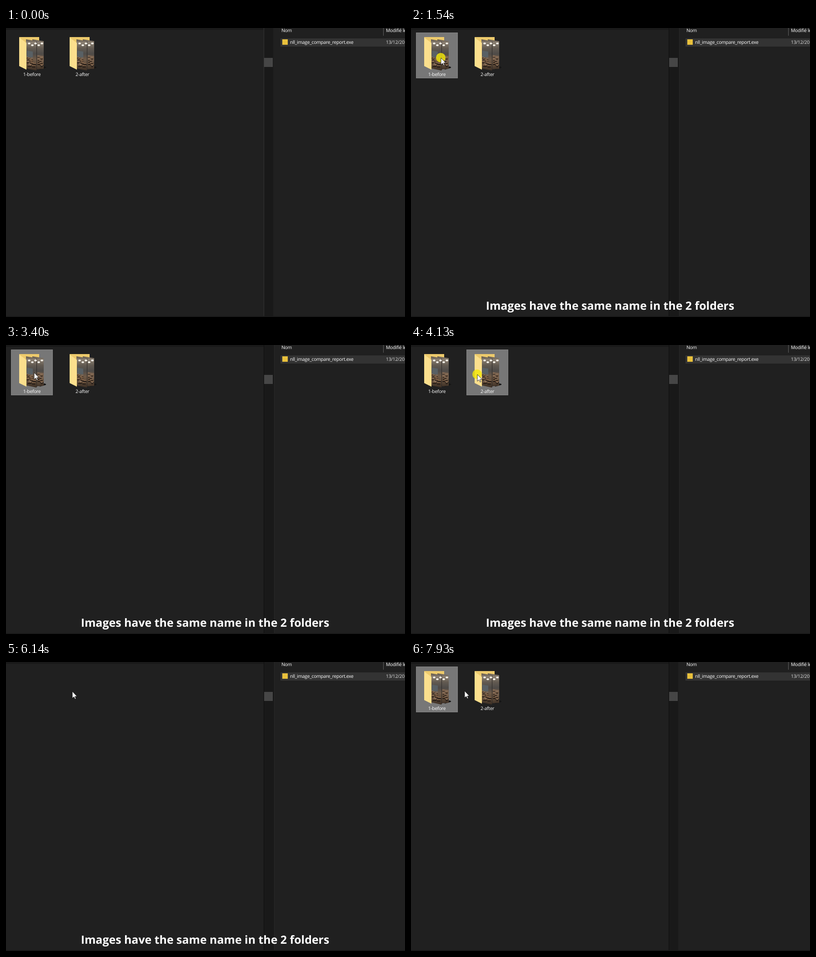
Write an HTML page with a canvas that moves like this. It is 878 px wide and 638 px high and loops after 8 s.

```html
<!DOCTYPE html>
<html lang="en">
<head>
<meta charset="utf-8">
<title>Folder browsing</title>
<style>
  html, body { margin: 0; width: 100%; height: 100%; overflow: hidden; background: #202020; }
  #stage { position: relative; width: 878px; height: 638px; overflow: hidden; }
  canvas { position: absolute; left: 0; top: 0; }
  span {
    position: absolute; white-space: nowrap; color: #fff;
    font: 500 10.4px/14px "Open Sans", "Noto Sans", sans-serif;
    letter-spacing: -0.3px; text-rendering: geometricPrecision;
  }
  .head { top: -1px; }
  .row { top: 25px; }
  .name { left: 606px; }
  .date { left: 836px; }
  .label { width: 100px; line-height: 13px; text-align: center; }
  .first { left: 7px; }
  .second { left: 118px; }
  #folders .label { top: 97px; }
  #images .label { top: 63px; }
  #caption {
    left: 0; width: 876px; top: 598px; text-align: center;
    font: 700 24.9px/30px "Open Sans", "Noto Sans", sans-serif;
    letter-spacing: 0;
  }
</style>
</head>
<body>
<div id="stage">
  <canvas id="scene" width="878" height="638"></canvas>
  <span class="head name">Nom</span>
  <span class="head date">Modifié le</span>
  <span class="row" style="left:625px">nll_image_compare_report.exe</span>
  <span class="row date" style="color:#ddd">13/12/20</span>
  <div id="folders">
    <span class="label first">1-before</span>
    <span class="label second">2-after</span>
  </div>
  <div id="images">
    <span class="label first">classroom<br>100spp.png</span>
    <span class="label second">classroom<br>300spp.png</span>
  </div>
  <span id="caption">Images have the same name in the 2 folders</span>
  <canvas id="pointer" width="878" height="638"></canvas>
</div>
<script>
const LOOP = 8000, STEP = 78, OPENING = 160, LEAVING = 150;
const byId = id => document.getElementById(id);
const g = byId('scene').getContext('2d');
const p = byId('pointer').getContext('2d');

const CAPTION = { from: 210, to: 6690 };
const SELECTS = [
  { at: 1140, item: 0, hold: 80 }, { at: 4130, item: 1, hold: 150 }, { at: 7240, item: 0, hold: 220 }
];
const VISITS = [{ open: 1540, back: 3250 }, { open: 4500, back: 6140 }];
const MOVES = [
  { from: 210, to: 910, x: 66, y: 66 }, { from: 2800, to: 2800, x: 62, y: 61 },
  { from: 3720, to: 3880, x: 146, y: 65 }, { from: 6690, to: 6920, x: 77, y: 62 },
  { from: 7860, to: 7930, x: 118, y: 64 }
];

const during = (t, from, to) => t >= from && t < to;

function viewAt(t) {
  for (const { open, back } of VISITS) {
    if (during(t, open + OPENING, back)) return 'images';
    if (during(t, open + OPENING / 2, back + LEAVING)) return 'empty';
  }
  return 'folders';
}

function pointerAt(t) {
  if (t < MOVES[0].from) return null;
  let x = 500, y = 485;
  for (const m of MOVES) {
    if (t < m.from) break;
    const span = m.to - m.from;
    const steps = Math.round(span / STEP) + 1;
    const done = t >= m.to ? steps : Math.floor((t - m.from) / span * (steps - 1)) + 1;
    x += (m.x - x) * done / steps;
    y += (m.y - y) * done / steps;
  }
  return { x: Math.round(x), y: Math.round(y) };
}

const isPressed = t => SELECTS.some(s => during(t, s.at, s.at + s.hold)) ||
  VISITS.some(v => during(t, v.open, v.open + OPENING));

function randomFrom(seed) {
  return () => (seed = (seed * 16807) % 2147483647) / 2147483647;
}

function rect(color, x, y, w, h) {
  g.fillStyle = color;
  g.fillRect(x, y, w, h);
}

// Upright slab whose top and bottom slope from the left to the right edge.
function slab(color, left, right, top, bottom, topRight = top, bottomRight = bottom) {
  g.fillStyle = color;
  g.beginPath();
  g.moveTo(left, top);
  g.lineTo(right, topRight);
  g.lineTo(right, bottomRight);
  g.lineTo(left, bottom);
  g.fill();
}

function dot(c, color, x, y, rx, ry = rx) {
  c.fillStyle = color;
  c.beginPath();
  c.ellipse(x, y, rx, ry, 0, 0, Math.PI * 2);
  c.fill();
}

function fade(height, ...colors) {
  const s = g.createLinearGradient(0, 0, 0, height);
  colors.forEach((c, i) => s.addColorStop(i / (colors.length - 1), c));
  return s;
}

// Loose desk tops with their shadows, larger toward the bottom.
function desks(seed, count, left, width, top, height) {
  const rnd = randomFrom(seed);
  for (let i = 0; i < count; i++) {
    const depth = i / count;
    const x = left + rnd() * width, y = top + depth * height;
    const w = 3 + depth * 5 * rnd() + 2 * rnd();
    rect('#2c221b', x, y + 1, w, 2 + depth * 2);
    rect(`hsl(28, 28%, ${38 + rnd() * 22}%)`, x, y, w, 1.3);
  }
}

function drawWindow(t) {
  const active = t >= SELECTS[0].at;
  rect('#202020', 0, 0, 878, 638);
  rect('#191919', 0, 0, 567, 4);
  rect('#191919', 567, 0, 21, 638);
  rect(active ? '#0d0d0d' : '#363636', 567, 0, 1, 638);
  if (during(t, CAPTION.from, CAPTION.to)) {
    rect('#191919', 588, 0, 2, 638);
    rect('#2a2a2a', 590, 0, 1, 638);
  }
  rect('#464646', 568, 66, 19, 20);
  rect('#191919', 0, 636, 878, 2);
  rect('#333333', 604, 23, 274, 18);
  rect('#636363', 830, 0, 1, 17);
  rect('#e8c03c', 608, 25, 12, 12);
}

function drawFolder(x) {
  const room = fade(74, '#40372f', '#8b8072', '#625a51', '#4e4b48', '#6f5a47', '#5b4938', '#3a2d23');
  g.save();
  g.translate(x, 20);
  slab('#151515', 45, 59, 62, 72, 66, 68);
  slab('#edca6c', 0, 44, 0, 60);
  slab(room, 29, 54, 5, 72, 9, 70);
  slab(room, 15, 38, 5, 69, 9, 74);
  slab('#596064', 17, 30, 30, 44, 32, 45);
  slab('#77604d', 40, 54, 40, 52, 42, 54);
  desks(23, 16, 16, 15, 44, 20);
  desks(41, 10, 40, 8, 42, 22);
  rect('#2d2927', 38, 10, 1, 63);
  for (let i = 0; i < 5; i++) dot(g, '#f2eee5', 22 + i * 7, 14 + i % 2 * 4, 2.8, 2);
  slab('#fbdf8d', 0, 16, 1, 64, 13, 72);
  g.restore();
}

function drawClassroom(x) {
  g.save();
  g.translate(x, 13);
  g.beginPath();
  g.rect(0, 0, 80, 45);
  g.clip();
  rect(fade(45, '#5f5446', '#9b8c78', '#75634f', '#594636', '#3b2d23'), 0, 0, 80, 45);
  slab('#7d6e5e', 0, 20, 6, 31, 13, 27);
  for (let i = 0; i < 5; i++) {
    rect('#c9bdac', 1 + i * 4, 8 + i, 2, 16 - i);
    rect('#4a4037', 3.5 + i * 4, 7 + i, 1, 22 - i);
  }
  slab('#8d7f6d', 64, 80, 10, 27, 0, 31);
  for (let i = 0; i < 3; i++) rect('#f4f0e8', 65 + i * 5, 8 - i * 3, 3.5, 17 + i * 3);
  rect('#4d3c2d', 31, 15, 23, 13);
  rect('#6c7270', 32, 16, 20, 10);
  for (let i = 0; i < 8; i++) dot(g, '#fff6e2', 12 + i * 7, i % 2 ? 9 : 4, 2.8, 1.3);
  desks(71, 46, -4, 80, 26, 18);
  slab('#b08258', 46, 68, 28, 32, 27, 30);
  slab('#65452e', 48, 68, 32, 40, 30, 38);
  g.restore();
}

function drawItems(view, selected, at) {
  const isFolder = view === 'folders';
  const h = isFolder ? 101 : 81;
  [11, 122].forEach((x, i) => {
    const hover = at && at.x >= x && at.x < x + 92 && at.y >= 10 && at.y < 10 + h;
    const chosen = isFolder && selected === i;
    if (chosen || hover) {
      rect(chosen ? '#858585' : '#555555', x, 10, 92, h);
      rect(chosen ? '#777777' : '#4d4d4d', x + 1, 11, 90, h - 2);
    }
    if (isFolder) drawFolder(x + 18);
    else drawClassroom(x + 5);
  });
}

const ARROW = new Path2D('M0 0V15L3.5 11.8 6 17 8 16 5.7 11H10.3Z');

function drawPointer(at, pressed) {
  p.clearRect(0, 0, 878, 638);
  if (!at) return;
  if (pressed) dot(p, 'rgba(242,230,10,.82)', at.x - .5, at.y - .5, 10.5);
  p.save();
  p.translate(at.x, at.y);
  p.fillStyle = '#fff';
  p.strokeStyle = '#111';
  p.lineWidth = .8;
  p.fill(ARROW);
  p.stroke(ARROW);
  p.restore();
}

function draw(t) {
  const view = viewAt(t);
  const at = pointerAt(t);
  const last = SELECTS.filter(s => s.at <= t).pop();
  drawWindow(t);
  if (view !== 'empty') drawItems(view, last ? last.item : -1, at);
  drawPointer(at, isPressed(t));
  byId('folders').hidden = view !== 'folders';
  byId('images').hidden = view !== 'images';
  byId('caption').hidden = !during(t, CAPTION.from, CAPTION.to);
}

const start = performance.now();
function tick(now) {
  draw(Math.max(0, now - start) % LOOP);
  requestAnimationFrame(tick);
}
draw(0);
requestAnimationFrame(tick);
</script>
</body>
</html>
```
